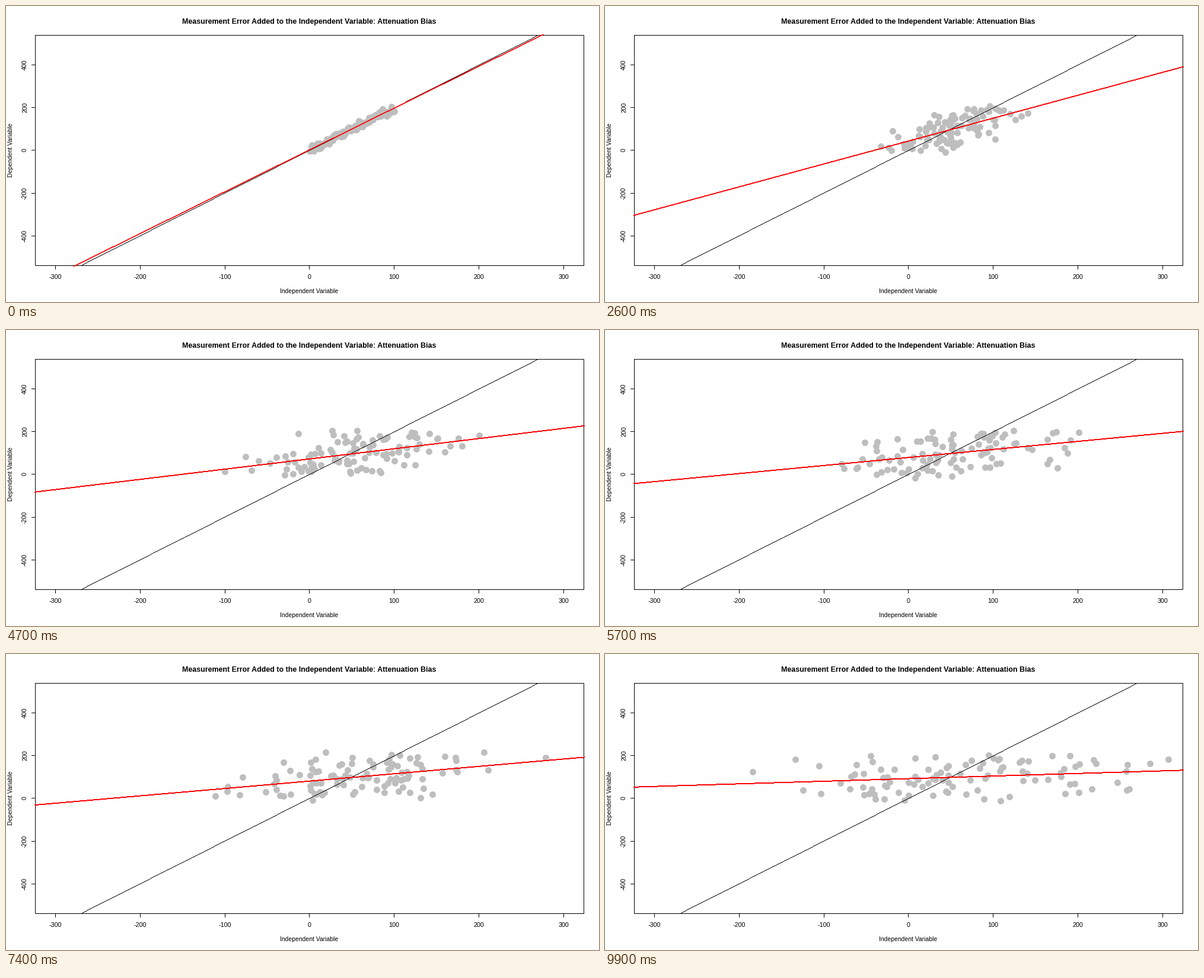
Write a matplotlib script that moves like this. It is 1000 px wide and 500 px high and loops after 10000 ms.

```python
import numpy as np
import matplotlib.pyplot as plt
from matplotlib.animation import FuncAnimation
from matplotlib.patches import Rectangle

W, H, DPI = 1000, 500, 100
LEFT, RIGHT, TOP, BOTTOM = 49.5, 974.5, 49.5, 438.5
XMAX, YMAX = 324, 540
FRAMES, STEP = 100, 100
PX = 72 / DPI  # points per pixel
SLOPE, Y_NOISE = 2, 10
EDGES = np.arange(48, 977)  # pixel columns a line may cover


def to_x(v):
    return (LEFT + RIGHT) / 2 + v * (RIGHT - LEFT) / (2 * XMAX)


def to_y(v):
    return (TOP + BOTTOM) / 2 - v * (BOTTOM - TOP) / (2 * YMAX)


def from_x(p):
    return (p - (LEFT + RIGHT) / 2) * 2 * XMAX / (RIGHT - LEFT)


def sample(i):
    """Fresh data for step i: the error in x has a spread of i."""
    rng = np.random.default_rng(1000 + i)
    true = np.arange(101.0)
    y = SLOPE * true + rng.normal(0, Y_NOISE, true.size)
    return true + rng.normal(0, 1, true.size) * i, y


def rows(slope, intercept, width):
    """Whole-pixel top and bottom of a line in each column."""
    y = to_y(intercept + slope * from_x(EDGES[:-1] + 0.5))
    top = np.floor(y - (width - 1) / 2)
    return top, top + width


fig = plt.figure(figsize=(W / DPI, H / DPI), dpi=DPI, facecolor="white")
ax = fig.add_axes([0, 0, 1, 1])
ax.set_xlim(0, W)
ax.set_ylim(H, 0)
ax.axis("off")


def clip(artist, pad):
    """Cut to the plot box, grown by pad pixels."""
    artist.set_clip_path(Rectangle(
        (LEFT - pad, TOP - pad), RIGHT - LEFT + 2 * pad, BOTTOM - TOP + 2 * pad,
        transform=ax.transData))
    return artist


def rule(x, y):
    ax.plot(x, y, color="black", lw=PX, snap=False, zorder=1,
            solid_joinstyle="miter")


def stepped_line(slope, intercept, color, width, pad, zorder):
    top, bottom = rows(slope, intercept, width)
    line = ax.stairs(bottom, EDGES, baseline=top, fill=True, color=color,
                     lw=0, snap=False, zorder=zorder)
    return clip(line, pad)


def label(x, y, text, size, turn=0, weight="normal"):
    ax.text(x, y, text, fontsize=size * PX, family="Liberation Sans",
            weight=weight, rotation=turn, rotation_mode="anchor",
            ha="center", va="baseline")


def pixel(v):
    return np.floor(v - 0.01) + 0.5


rule([LEFT, RIGHT, RIGHT, LEFT, LEFT], [TOP, TOP, BOTTOM, BOTTOM, TOP])
for v in range(-300, 301, 100):
    p = pixel(to_x(v))
    rule([p, p], [BOTTOM, BOTTOM + 6])
    label(p, 461, str(v), 10.8)
for v in range(-400, 401, 200):
    p = pixel(to_y(v))
    rule([LEFT - 6, LEFT], [p, p])
    label(35, p, str(v), 10.6, turn=90)

label(511.3, 30, "Measurement Error Added to the Independent Variable: Attenuation Bias",
      12.4, weight="bold")
label(511.3, 485, "Independent Variable", 10.35)
label(10.7, 243.7, "Dependent Variable", 10.35, turn=90)

dots = clip(ax.plot([], [], "o", ms=11 * PX, color="#bebebe", mew=0, zorder=2)[0], 0.5)
stepped_line(SLOPE, 0, "black", 1, 0.5, 3)
fit = stepped_line(SLOPE, 0, "red", 2, 1.5, 4)


def draw(i):
    x, y = sample(i)
    dots.set_data(to_x(x), to_y(y))
    slope, intercept = np.polyfit(x, y, 1)
    top, bottom = rows(slope, intercept, 2)
    fit.set_data(values=bottom, baseline=top)
    return dots, fit


anim = FuncAnimation(fig, draw, frames=FRAMES, interval=STEP, repeat=True,
                     repeat_delay=0, init_func=lambda: draw(0))
plt.show()
```
